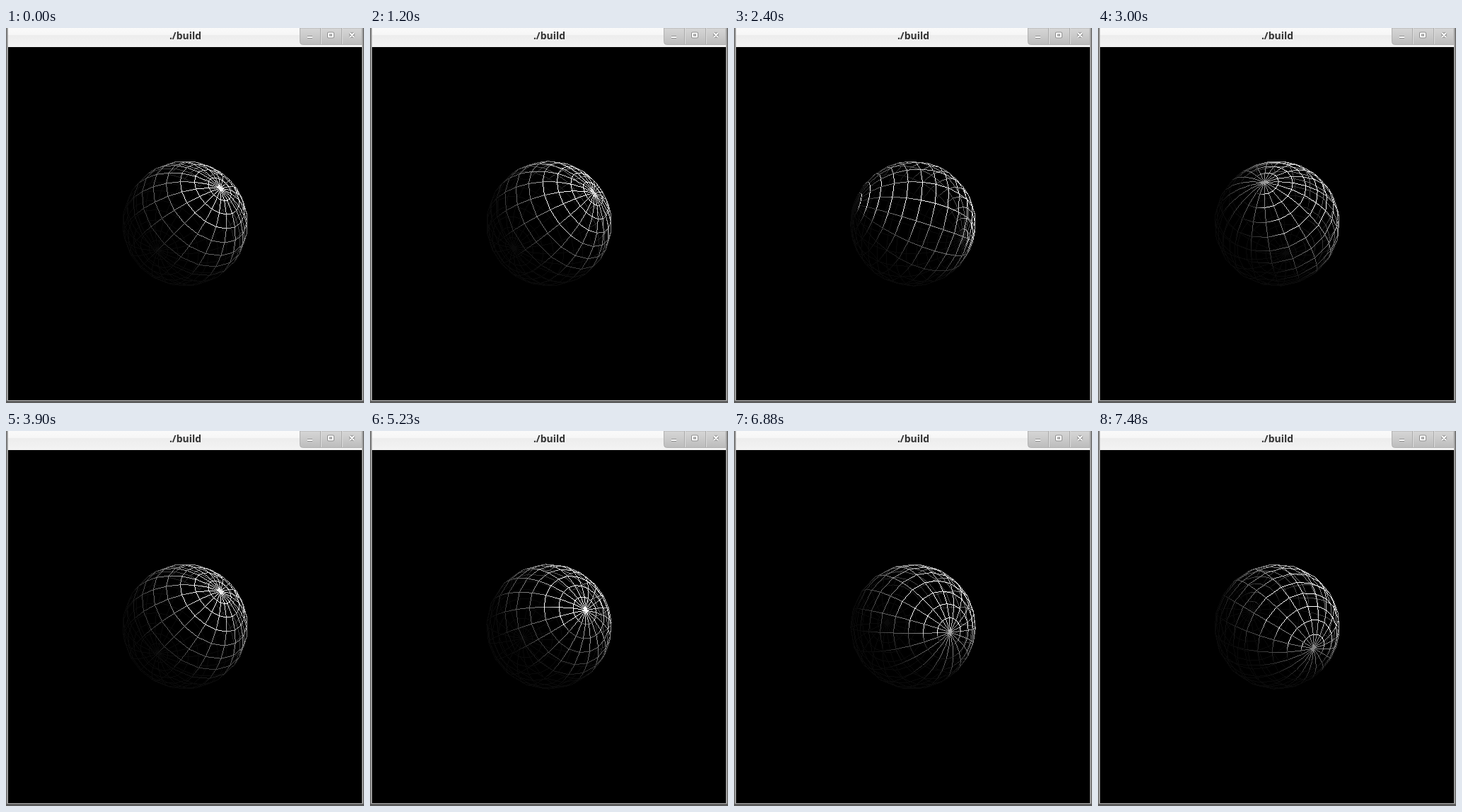
Write an HTML page with a canvas that moves like this. It is 506 by 531 pixels and loops after 8 s.

```html
<!DOCTYPE html>
<html lang="en">
<head>
<meta charset="utf-8">
<title>./build</title>
<style>
  html, body { margin: 0; width: 100%; height: 100%; overflow: hidden; background: #000; }
  svg { position: absolute; left: 0; top: 0; display: block; }
  canvas { position: absolute; left: 153px; top: 177px; width: 200px; height: 200px; image-rendering: pixelated; }
</style>
</head>
<body>
<svg width="506" height="531" viewBox="0 0 506 531">
  <defs>
    <linearGradient id="bar" x1="0" y1="0" x2="0" y2="1">
      <stop offset="0" stop-color="#fafafa"/>
      <stop offset=".36" stop-color="#f6f6f6"/>
      <stop offset=".38" stop-color="#ededed"/>
      <stop offset="1" stop-color="#f3f3f3"/>
    </linearGradient>
    <linearGradient id="btn" x1="0" y1="0" x2="0" y2="1">
      <stop offset="0" stop-color="#d6d6d6"/>
      <stop offset=".45" stop-color="#cbcbcb"/>
      <stop offset="1" stop-color="#bcbcbc"/>
    </linearGradient>
  </defs>
  <rect width="506" height="531" fill="#8c8c8c"/>
  <rect width="1" height="531" fill="#6e6e6e"/>
  <rect x="505" width="1" height="531" fill="#6e6e6e"/>
  <rect x="2" width="1" height="528" fill="#b0b0b0"/>
  <rect x="503" width="1" height="528" fill="#b0b0b0"/>
  <rect x="2" y="527" width="502" height="1" fill="#b4b4b4"/>
  <rect y="528" width="506" height="3" fill="#5c5c5c"/>
  <rect x="3" width="500" height="27" fill="url(#bar)"/>
  <rect x="3" y="27" width="500" height="500"/>
  <text x="253.5" y="16" text-anchor="middle" font-family="'Open Sans', 'Noto Sans', sans-serif" font-weight="700" font-size="14" fill="#333">./build</text>
  <path d="M415.500 0V19.500Q415.500 23.500 419.500 23.500H503V0Z" fill="url(#btn)" stroke="#b0b0b0"/>
  <path d="M444.500 0V23M474.500 0V23" stroke="#aaa"/>
  <path d="M445.500 0V23M475.500 0V23" stroke="#dedede"/>
  <g fill="none" stroke-linejoin="round">
    <g stroke="#8f8f8f" stroke-width="4">
      <path id="icons" d="M426 13H433M456 7.500H462V12.500H456ZM486 7L492 13M492 7L486 13"/>
    </g>
    <use href="#icons" stroke="#fff" stroke-width="2"/>
  </g>
</svg>
<canvas id="view" width="200" height="200"></canvas>
<script>
const SIZE = 200, MID = SIZE / 2, LOOP = 8000;
const SLICES = 20, STACKS = 16, EYE = 5;
const FOCAL = 250 / Math.tan(Math.PI / 6);
const RAD = Math.PI / 180;

const ctx = document.getElementById('view').getContext('2d');
const image = ctx.createImageData(SIZE, SIZE);
const depth = new Float32Array(SIZE * SIZE);

// [time, degrees added] for each axis
const yaw = [
  [1200, 10], [1350, 10], [1650, 20], [1800, 10], [1950, 10],
  [2250, 20], [2400, 10], [2700, 20], [2850, 20], [3000, 10],
  [3300, 10], [3450, 10], [3600, 10], [3900, 10]
];
const pitch = [4650, 4940, 5090, 5230, 5380, 5680, 5980, 6880, 7180, 7330, 7480].map(t => [t, 5]);

const angleAt = (start, steps, t) =>
  steps.reduce((sum, [at, deg]) => t >= at ? sum + deg : sum, start);

const dot = (a, b) => a[0] * b[0] + a[1] * b[1] + a[2] * b[2];
const unit = v => v.map(c => c / Math.sqrt(dot(v, v)));
const LIGHT = unit([1, 1, 1]);
const HALF = unit([LIGHT[0], LIGHT[1], LIGHT[2] + 1]);

// Ambient, diffuse and a specular highlight; normals may exceed unit length
function shade(n) {
  const d = dot(n, LIGHT);
  if (d <= 0) return 0.04;
  return Math.min(1, 0.04 + 0.8 * d + Math.pow(Math.max(0, dot(n, HALF)), 50));
}

function rotator(a, b) {
  const ca = Math.cos(a * RAD), sa = Math.sin(a * RAD);
  const cb = Math.cos(b * RAD), sb = Math.sin(b * RAD);
  return ([x, y, z]) => {
    const u = x * cb + z * sb, w = z * cb - x * sb;
    return [u, y * ca - w * sa, y * sa + w * ca];
  };
}

function vertex(turn, pos, normal) {
  const [x, y, z] = turn(pos);
  const inv = 1 / (EYE - z);
  return { x: MID + FOCAL * x * inv, y: MID - FOCAL * y * inv, inv, c: shade(turn(normal)) };
}

function plot(x, y, inv, c) {
  if (x < 0 || y < 0 || x >= SIZE || y >= SIZE) return;
  const i = y * SIZE + x;
  if (inv <= depth[i]) return;
  depth[i] = inv;
  image.data.fill(Math.round(c * 255), i * 4, i * 4 + 3);
}

// One-pixel line without smoothing
function line(p, q) {
  const steep = Math.abs(q.y - p.y) > Math.abs(q.x - p.x);
  const main = steep ? 'y' : 'x', side = steep ? 'x' : 'y';
  if (p[main] > q[main]) [p, q] = [q, p];
  const end = Math.ceil(q[main] - 0.5);
  for (let m = Math.ceil(p[main] - 0.5); m < end; m++) {
    const k = (m + 0.5 - p[main]) / (q[main] - p[main]);
    const mix = key => p[key] + (q[key] - p[key]) * k;
    const s = Math.floor(mix(side));
    plot(steep ? s : m, steep ? m : s, mix('inv'), mix('c'));
  }
}

function strip(count, make) {
  let last = make(0);
  for (let i = 1; i <= count; i++) {
    const next = make(i);
    line(last, next);
    last = next;
  }
}

function drawSphere(a, b) {
  const turn = rotator(a, b);
  depth.fill(0);
  for (let i = 0; i < image.data.length; i += 4) {
    image.data.fill(0, i, i + 3);
    image.data[i + 3] = 255;
  }
  // Rings keep an unscaled normal, so they shine brighter near the poles
  for (let i = 1; i < STACKS; i++) {
    const r = Math.sin(Math.PI * i / STACKS), z = Math.cos(Math.PI * i / STACKS);
    strip(SLICES, j => {
      const x = Math.cos(2 * Math.PI * j / SLICES), y = Math.sin(2 * Math.PI * j / SLICES);
      return vertex(turn, [x * r, y * r, z], [x, y, z]);
    });
  }
  for (let j = 0; j < SLICES; j++) {
    const x = Math.cos(2 * Math.PI * j / SLICES), y = Math.sin(2 * Math.PI * j / SLICES);
    strip(STACKS, i => {
      const r = Math.sin(Math.PI * i / STACKS);
      const n = [x * r, y * r, Math.cos(Math.PI * i / STACKS)];
      return vertex(turn, n, n);
    });
  }
  ctx.putImageData(image, 0, 0);
}

let shown = '';
function update(now) {
  const t = now % LOOP;
  const a = angleAt(-35, pitch, t), b = angleAt(30, yaw, t);
  const pose = a + ',' + b;
  if (pose !== shown) drawSphere(a, b);
  shown = pose;
}

const begin = performance.now();
function tick() {
  update(performance.now() - begin);
  requestAnimationFrame(tick);
}
tick();
</script>
</body>
</html>
```
